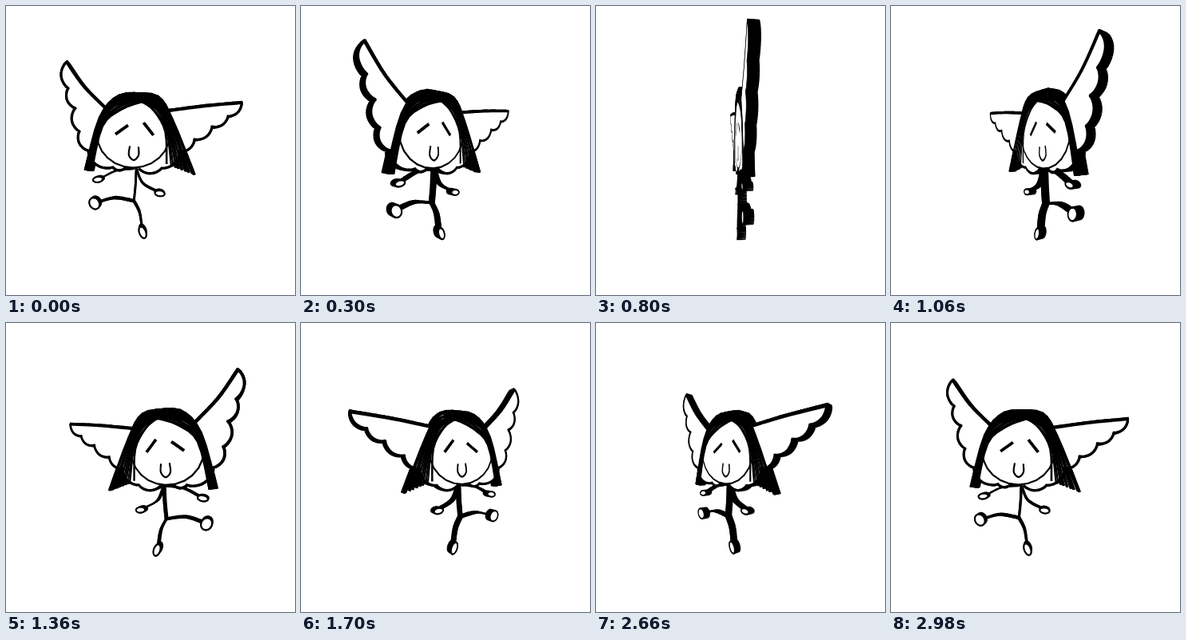
Animation, 362 px wide and 362 px high, one loop 3 s. Source, as an HTML page with a canvas:

```html
<!DOCTYPE html>
<html lang="en">
<head>
<meta charset="utf-8">
<title>Spinning angel doodle</title>
<style>
  html, body { margin: 0; width: 100%; height: 100%; overflow: hidden; background: #fff; }
  canvas { display: block; width: 362px; height: 362px; }
</style>
</head>
<body>
<canvas id="stage" width="362" height="362"></canvas>
<script>
const ctx = document.getElementById('stage').getContext('2d');
const LOOP = 3000, STEP = 20;
const CENTER = 181, CAMERA = 316, HALF = 5.2;
const FRONT = CAMERA / (CAMERA - HALF); // scale of the front face when seen straight on
const INK = '#000', PAPER = '#fff';

const mix = (a, b, t) => a.map((v, i) => v + (b[i] - v) * t);
const noise = n => { const v = Math.sin(n * 12.9898) * 43758.5453; return v - Math.floor(v); };
const toModel = p => p.map(v => (v - CENTER) / FRONT);

// Catmull-Rom curve through key points
function smooth(p, n = 6) {
  const out = [p[0]];
  for (let i = 0; i < p.length - 1; i++) {
    const a = p[i - 1] || p[i], b = p[i], c = p[i + 1], d = p[i + 2] || c;
    for (let k = 1; k <= n; k++) {
      const t = k / n;
      out.push([0, 1].map(j => b[j] + t / 2 * (c[j] - a[j] +
        t * (2 * a[j] - 5 * b[j] + 4 * c[j] - d[j] + t * (3 * (b[j] - c[j]) + d[j] - a[j])))));
    }
  }
  return out;
}

// A stroke as a chain of slightly overlapping rectangles
function rects(points, w) {
  const out = [];
  for (let i = 1; i < points.length; i++) {
    const [ax, ay] = points[i - 1], [bx, by] = points[i];
    const len = Math.hypot(bx - ax, by - ay);
    if (len < 0.01) continue;
    const ux = (bx - ax) / len * w / 2, uy = (by - ay) / len * w / 2, e = 0.6;
    out.push([
      [ax - ux * e - uy, ay - uy * e + ux], [bx + ux * e - uy, by + uy * e + ux],
      [bx + ux * e + uy, by + uy * e - ux], [ax - ux * e + uy, ay - uy * e - ux]
    ]);
  }
  return out;
}

const shapes = [];
function add(points, w, filled = false) {
  const area = points.map(toModel);
  shapes.push({ area, filled, quads: w ? rects(area, w / FRONT) : [] });
}
const line = (w, ...points) => add(smooth(points), w);

function oval([cx, cy], rx, ry, tilt, w) {
  const c = Math.cos(tilt), s = Math.sin(tilt);
  add(Array.from({ length: 25 }, (_, i) => {
    const a = i / 12 * Math.PI, x = rx * Math.cos(a), y = ry * Math.sin(a);
    return [cx + x * c - y * s, cy + x * s + y * c];
  }), w, true);
}

// Rounded feather between two notches; the sign of bulge picks the side
function feather(a, b, bulge) {
  return Array.from({ length: 13 }, (_, i) => {
    const t = i / 12, h = bulge * Math.sin(Math.PI * t) ** 0.75;
    const [x, y] = mix(a, b, t);
    return [x + (b[1] - a[1]) * h, y - (b[0] - a[0]) * h];
  });
}

function wing(root, bend, bulge, ...notches) {
  const top = smooth([root, bend, notches[0]]);
  const edge = notches.slice(1).flatMap((p, i) => feather(notches[i], p, bulge));
  add([...top, ...edge], 0, true);
  add(top, 4.2);
  add(edge, 3.2);
}

// Strands fanned out between an outer and an inner guide
function hair(count, seed, outer, inner) {
  for (let i = 0; i < count; i++) {
    const strand = outer.map((p, j) => {
      const k = i / (count - 1) + (noise(seed + i * 7 + j) - 0.5) * 0.12;
      return mix(p, inner[j], k);
    });
    add(smooth(strand, 4), 2.2 + noise(seed + i) * 0.8);
  }
}

// Curved limb ending in an oval hand or foot
function limb(w, from, bend, to, length, width, turn = 0) {
  line(w, from, bend, to);
  const aim = Math.atan2(to[1] - bend[1], to[0] - bend[0]);
  const center = [to[0] + Math.cos(aim) * length * 0.9, to[1] + Math.sin(aim) * length * 0.9];
  oval(center, length, width, aim + turn, 2);
}

wing([127, 130], [98, 101], -0.24,
  [76, 70], [78, 103], [87, 128], [92, 157], [103, 181], [134, 202], [150, 202]);
wing([204, 131], [250, 125], 0.22,
  [295, 121], [278, 138], [258, 151], [236, 167], [217, 182], [195, 203], [167, 204]);

oval([159.5, 161], 45.5, 41.5, 0, 2.2);
line(3.8, [138, 160], [152, 150]);
line(3.8, [173, 147], [184, 161]);
line(2.2, [155, 176], [154, 187], [160, 193], [166, 187], [166, 177]);

hair(9, 3, [[176, 110], [142, 112], [117, 140], [99, 205]], [[171, 120], [145, 130], [121, 151], [107, 206]]);
hair(10, 90, [[158, 109], [190, 114], [209, 143], [237, 211]], [[171, 120], [186, 132], [200, 157], [203, 198]]);

const neck = [163, 203], hip = [160, 245];
line(2.4, neck, [162, 225], hip);
limb(2.2, [160, 204], [139, 206], [120, 215], 6, 3.4, 0.3);
limb(2.2, neck, [171, 222], [188, 232], 6, 3.5, -0.4);
limb(2.4, hip, [136, 241], [116, 246], 6, 7.4, -0.3);
limb(2.4, hip, [167, 259], [170, 277], 7.5, 4, -0.2);

function draw(angle) {
  const c = Math.cos(angle), s = Math.sin(angle);
  const project = ([x, y], z) => {
    const k = CAMERA / (CAMERA - (z * c - x * s));
    return [CENTER + (x * c + z * s) * k, CENTER + y * k];
  };
  // Same winding everywhere, so overlapping pieces merge in one fill
  const trace = poly => {
    let area = 0;
    poly.forEach(([x, y], i) => {
      const [nx, ny] = poly[(i + 1) % poly.length];
      area += x * ny - nx * y;
    });
    if (area < 0) poly.reverse();
    poly.forEach(([x, y], i) => i ? ctx.lineTo(x, y) : ctx.moveTo(x, y));
    ctx.closePath();
  };
  const paint = (color, build) => {
    ctx.beginPath();
    build();
    ctx.fillStyle = color;
    ctx.fill();
  };

  ctx.fillStyle = PAPER;
  ctx.fillRect(0, 0, 362, 362);

  // Side walls, then the face turned to the viewer
  for (const { quads } of shapes) {
    paint(INK, () => quads.forEach(q => {
      const near = q.map(p => project(p, HALF)), far = q.map(p => project(p, -HALF));
      near.forEach((p, i) => {
        const j = (i + 1) % 4;
        trace([p, near[j], far[j], far[i]]);
      });
      trace([...near]);
      trace([...far]);
    }));
  }

  if (Math.abs(c) * CAMERA <= HALF) return;
  const face = Math.sign(c) * HALF;
  for (const { area, filled, quads } of shapes) {
    if (filled) paint(PAPER, () => trace(area.map(p => project(p, face))));
    paint(INK, () => quads.forEach(q => trace(q.map(p => project(p, face)))));
  }
}

let shown = -1;
function tick() {
  const step = Math.floor(performance.now() % LOOP / STEP);
  if (step !== shown) draw(step * STEP / LOOP * 2 * Math.PI);
  shown = step;
  requestAnimationFrame(tick);
}
tick();
</script>
</body>
</html>
```
